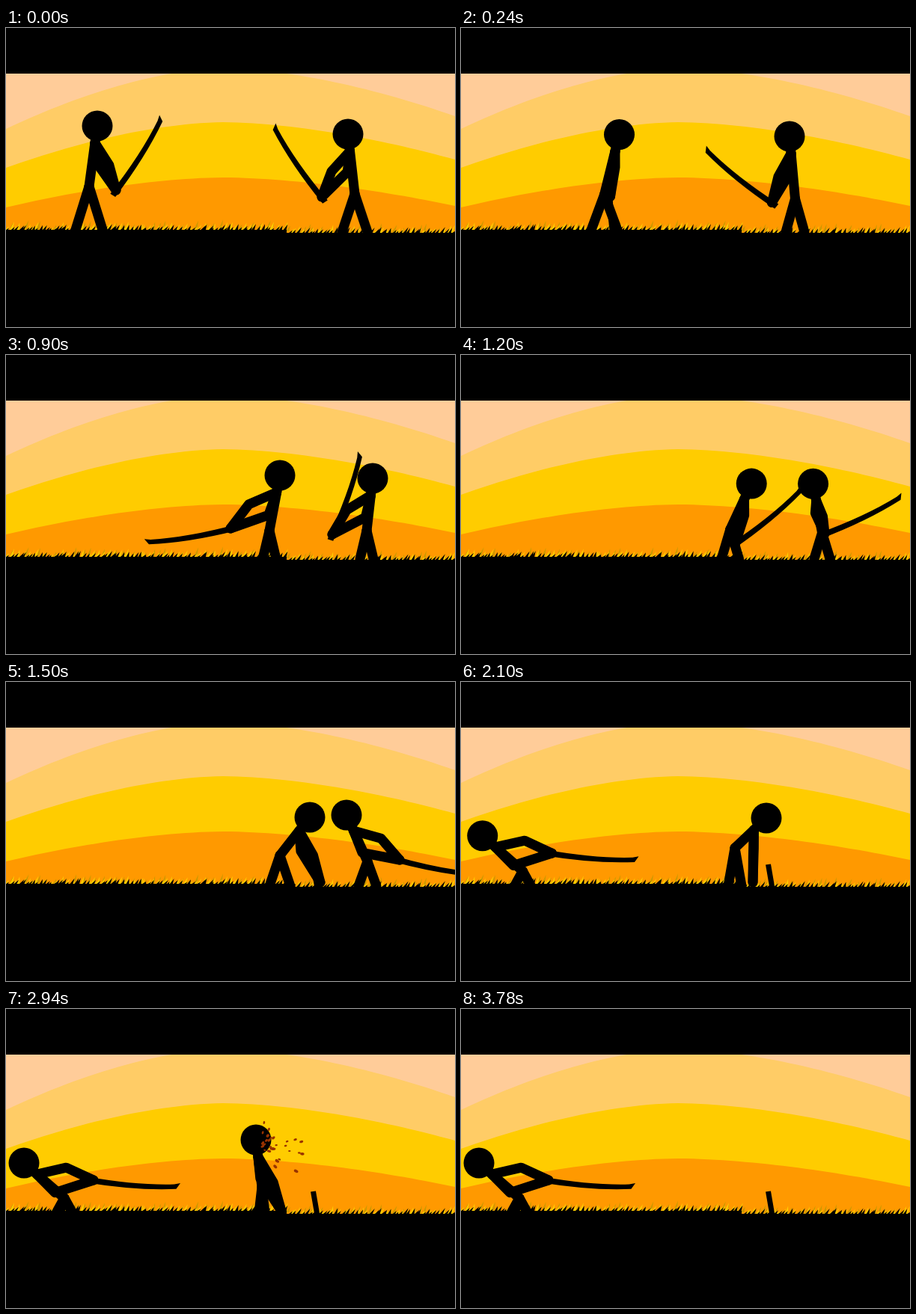
Animation, 600 px wide and 400 px high, one loop 4260 ms. Source, as an HTML page with a canvas:

```html
<!DOCTYPE html>
<html lang="en">
<head>
<meta charset="utf-8">
<title>Sunset duel</title>
<style>
  html, body { margin: 0; width: 100%; height: 100%; overflow: hidden; background: #000; }
  canvas { display: block; }
</style>
</head>
<body>
<canvas id="stage" width="600" height="400"></canvas>
<script>
const ctx = document.getElementById('stage').getContext('2d');
const LOOP = 4260, STEP = 60;
const STABBED = 1440, BLOOD_START = 2640;

const easeOut = k => 1 - (1 - k) ** 3;
const fall = k => k ** 2.4;
const linear = k => k;

// A fighter is posed by head, hip, hand, stride and sword angle; the rig derives the rest.
const leftMoves = [
  { at: 0, head: [122, 131], hip: [111, 212], hand: [147, 217], stride: 19, sword: -58 },
  { at: 480, head: [301, 154], hip: [272, 234], hand: [252, 234], stride: 18, sword: 223 },
  { at: 900, head: [366, 161], hip: [352, 235], hand: [300, 232], stride: 9, sword: 531 },
  { at: STABBED, until: 1620, head: [406, 181], hip: [366, 232], hand: [420, 268], stride: 14, sword: 800 },
  { at: 2100, until: 2520, head: [408, 182], hip: [366, 222], hand: [390, 268], stride: 9, sword: 800 },
  { at: 2940, head: [334, 175], hip: [342, 238], hand: [368, 270], stride: 4, sword: 800 },
  { at: 3780, head: [293, 294], hip: [322, 290], hand: [345, 292], stride: 4, sword: 800, ease: fall },
];
const rightMoves = [
  { at: 0, head: [457, 142], hip: [466, 222], hand: [422, 226], stride: 17, sword: 236 },
  { at: 480, head: [421, 148], hip: [427, 235], hand: [409, 241], stride: 8, sword: 202 },
  { at: 900, head: [490, 165], hip: [482, 235], hand: [436, 240], stride: 9, sword: 289 },
  { at: 1440, until: 1680, head: [455, 178], hip: [483, 240], hand: [526, 238], stride: 12, sword: 370 },
  { at: 2220, head: [24, 206], hip: [78, 253], hand: [117, 229], stride: 11, sword: 364, ease: easeOut },
];

const mix = (a, b, k) => Array.isArray(a) ? a.map((v, i) => mix(v, b[i], k)) : a + (b - a) * k;

function poseAt(moves, t) {
  const next = moves.findIndex(move => move.at > t);
  if (next < 0) return moves[moves.length - 1];
  const from = moves[next - 1], to = moves[next];
  const start = from.until || from.at;
  const k = (to.ease || linear)(Math.max(0, (t - start) / (to.at - start)));
  const pose = {};
  for (const part of ['head', 'hip', 'hand', 'stride', 'sword']) pose[part] = mix(from[part], to[part], k);
  return pose;
}

function neckOf({ head, hip }) {
  return mix(head, hip, 23 / Math.hypot(hip[0] - head[0], hip[1] - head[1]));
}

function randomizer(seed) {
  return () => (seed = (seed * 16807) % 2147483647) / 2147483647;
}

function limb(...points) {
  ctx.beginPath();
  for (const [x, y] of points) ctx.lineTo(x, y);
  ctx.stroke();
}

// Elbows spread apart the more the arms reach sideways
function drawArm(shoulder, hand, along, spread) {
  const dx = hand[0] - shoulder[0], dy = hand[1] - shoulder[1];
  const bend = spread * dx / (dx * dx + dy * dy);
  const [x, y] = mix(shoulder, hand, along);
  limb(shoulder, [x - dy * bend, y + dx * bend], hand);
}

function drawSword([x, y], degrees) {
  const angle = degrees * Math.PI / 180, length = 116, grip = 8;
  ctx.save();
  ctx.translate(x, y);
  ctx.rotate(angle);
  ctx.scale(1, Math.cos(angle) < 0 ? -1 : 1); // the belly of the blade hangs down
  ctx.beginPath();
  ctx.moveTo(-grip, -4);
  ctx.quadraticCurveTo(length / 2, 3, length - 8, -2);
  ctx.lineTo(length, -4);
  ctx.lineTo(length - 5, 4);
  ctx.quadraticCurveTo(length / 2, 10, -grip, 4);
  ctx.fill();
  ctx.restore();
}

function drawFighter(pose, armed) {
  const { head, hip, hand, stride, sword } = pose;
  const neck = neckOf(pose), floor = Math.max(273, hip[1]);
  ctx.fillStyle = ctx.strokeStyle = '#000';
  ctx.lineWidth = 13;
  ctx.lineCap = ctx.lineJoin = 'round';
  ctx.beginPath();
  ctx.arc(...head, 20.5, 0, 7);
  ctx.fill();
  limb(head, neck, hip);
  for (const side of [-1, 1]) limb(hip, [hip[0] + side * stride, floor]);
  drawArm(neck, hand, .5, -13);
  drawArm(neck, hand, .35, 22);
  if (armed) drawSword(hand, sword);
}

function drawSky() {
  ctx.fillStyle = '#ffcc99';
  ctx.fillRect(0, 60, 600, 240);
  const bands = [
    { color: '#ffcc66', start: 135, crest: 54, end: 118 },
    { color: '#ffcc00', start: 187, crest: 126, end: 176 },
    { color: '#ff9900', start: 240, crest: 200, end: 238 },
  ];
  for (const { color, start, crest, end } of bands) {
    ctx.fillStyle = color;
    ctx.beginPath();
    ctx.moveTo(0, 300);
    for (let x = 0; x <= 600; x += 10) {
      const u = (x - 290) / (x < 290 ? 290 : 310);
      ctx.lineTo(x, crest + ((u < 0 ? start : end) - crest) * Math.abs(u) ** 1.7);
    }
    ctx.lineTo(600, 300);
    ctx.fill();
  }
}

const groundAt = x => x < 375 ? 270 : 274;

function drawBlades(color, seed, spacing, lift) {
  const random = randomizer(seed);
  ctx.fillStyle = color;
  ctx.beginPath();
  for (let x = -6; x < 604; x += spacing * (.5 + random())) {
    const ground = groundAt(x);
    ctx.moveTo(x, ground + 2);
    ctx.lineTo(x + 5 + random() * 4, ground - lift * (.3 + random() * .7));
    ctx.lineTo(x + 5, ground + 2);
  }
  ctx.fill();
}

function drawGround() {
  drawBlades('#000', 77, 5, 8);
  for (const x of [0, 375]) ctx.fillRect(x, groundAt(x), 375, 130);
  ctx.fillRect(0, 0, 600, 61);
}

function drawBlood(t, [x, y]) {
  const random = randomizer(4242);
  ctx.fillStyle = '#993300';
  for (let i = 0; i < 34; i++) {
    const age = (t - BLOOD_START - random() * 250) / 260;
    const angle = -.4 + (random() + random() - 1) * 1.3;
    const distance = (20 + 55 * random()) * age, size = 1 + random();
    if (age <= 0 || age >= 1) continue;
    ctx.beginPath();
    ctx.ellipse(x + Math.cos(angle) * distance, y - 12 + Math.sin(angle) * distance + 8 * age * age,
      size * 1.6, size, angle, 0, 7);
    ctx.fill();
  }
}

function draw(t) {
  const victim = poseAt(leftMoves, t);
  drawSky();
  drawBlades('#cc9900', 31, 10, 14);
  drawBlades('#ffcc00', 53, 6, 11);
  drawFighter(victim, t < STABBED);
  drawFighter(poseAt(rightMoves, t), true);
  if (t >= STABBED) {
    ctx.lineWidth = 7;
    ctx.lineCap = 'butt';
    limb([410.5, 244], [416, 276]);
  }
  drawGround();
  drawBlood(t, neckOf(victim));
}

function tick() {
  const t = performance.now() % LOOP;
  draw(Math.floor(t / STEP) * STEP);
  requestAnimationFrame(tick);
}
tick();
</script>
</body>
</html>
```
